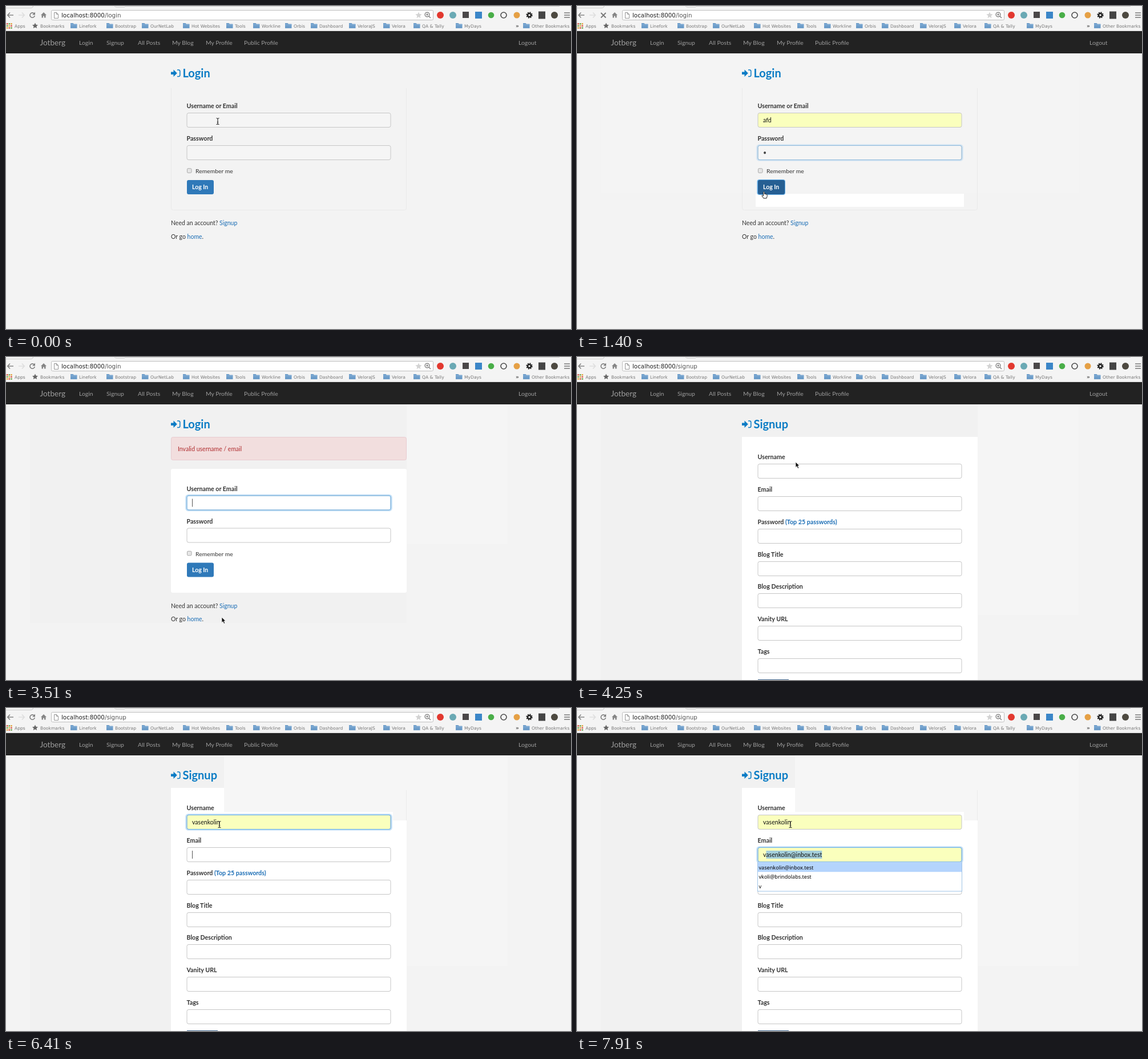
These frames come from a looping animation (990x566 px, 8 s). An HTML page:

```html
<!DOCTYPE html>
<html lang="en">
<head>
<meta charset="utf-8">
<title>Login and signup</title>
<style>
html, body { margin: 0; width: 100%; height: 100%; overflow: hidden; background: #f3f3f3; }
svg { display: block; width: 990px; height: 566px; }
text { white-space: pre; }
</style>
</head>
<body>
<svg id="stage" viewBox="0 0 990 566"></svg>
<script>
const UI = 'Lato, sans-serif', CHROME = '"DejaVu Sans", sans-serif', MENU = '"Noto Sans", sans-serif';
const USER = 'vasenkolin', MAIL = USER + '@inbox.test', WORK = 'vkoli@brindolabs.test';
const BLUE = '#0a7cc5', LINK = '#1a6db5', INK = '#333', LEFT = 326;

const rect = (x, y, w, h, fill, extra = '') =>
  `<rect x="${x}" y="${y}" width="${w}" height="${h}" fill="${fill}" ${extra}/>`;
const path = (d, fill, stroke = 'none', width = 1, extra = '') =>
  `<path d="${d}" fill="${fill}" stroke="${stroke}" stroke-width="${width}" ${extra}/>`;
const circle = (x, y, r, fill, extra = '') => `<circle cx="${x}" cy="${y}" r="${r}" fill="${fill}" ${extra}/>`;
const text = (x, y, s, size = 10.5, fill = INK, weight = 400, font = UI) =>
  `<text x="${x}" y="${y}" font-size="${size}" fill="${fill}" font-weight="${weight}" font-family='${font}'>${s}</text>`;
const link = s => `<tspan fill="${LINK}">${s}</tspan>`;

const pen = document.createElement('canvas').getContext('2d');
const widthOf = s => {
  pen.font = '10.6px ' + UI;
  return pen.measureText(s).width;
};

function folder(x, name) {
  return path(`M${x} 30h4.5l1.5 1.5h5.5v7.5h-11.5z`, '#6c9cc9') +
    path(`M${x} 33h11.5`, 'none', '#8fb7dc') + text(x + 15, 37.6, name, 7.6, '#777', 400, CHROME);
}

function toolbar() {
  let s = rect(0, 0, 990, 44, '#f4f4f4') + rect(0, 43, 990, 1, '#dcdcdc') +
    path('M0 3.5H44q3 0 4-4M190 0q1 2 4 2h14M208 .5H970', 'none', '#ccc') +
    path('M13 16H3M7 11.500L2.800 16l4.200 4.500', 'none', '#868686', 1.7) +
    path('M22 16h10M28 11.500l4.200 4.500-4.200 4.500', 'none', '#dedede', 1.7) +
    path('M61 16l5-5 5 5h-1.500v4.500h-2.500v-3h-2v3h-2.500v-4.500z', '#858585') +
    rect(79.5, 7.5, 669, 17, '#fff', 'rx="2" stroke="#bdbdbd"') +
    path('M84.500 11.500h4l3 3v7h-7zM88.500 11.500v3h3', '#fff', '#888', .9) +
    path('M723 10.500l1.600 3.600 4 .4-3 2.700.9 4-3.500-2.100-3.500 2.100.9-4-3-2.700 4-.4z', '#d3d3d3') +
    circle(738, 15, 3.9, 'none', 'stroke="#777" stroke-width="1.300"') +
    path('M741 18l3 3M736 15h4M738 13v4', 'none', '#777', 1.2);
  s += circle(761, 16, 6, '#e2382f') + circle(783, 16, 6, '#6aa9b4') + rect(800, 10, 11, 11, '#4a4748') +
    rect(822, 10, 12, 12, '#3b86c8') + circle(850, 16, 5.3, '#49ae48') +
    circle(872, 16, 5, 'none', 'stroke="#4b4b4b" stroke-width="1.600"') +
    circle(895, 16, 5.5, '#e5a045') +
    circle(917, 16, 4.7, 'none', 'stroke="#222" stroke-width="2" stroke-dasharray="1.850"') +
    circle(917, 16, 3, 'none', 'stroke="#222" stroke-width="2.500"') +
    rect(933, 9.5, 12, 13, '#444') + circle(961, 16, 6, '#4d4940') +
    path('M978 12h10M978 16h10M978 20h10', 'none', '#777', 1.7);
  for (let i = 0; i < 9; i++)
    s += rect(1 + i % 3 * 3.6, 30 + (i / 3 | 0) * 3.6, 2.5, 2.5, ['#d9534a', '#6aa84f', '#e0a33b'][(i + (i / 3 | 0)) % 3]);
  s += text(15, 37.6, 'Apps', 7.6, '#777', 400, CHROME) +
    path('M51 29.500l1.500 3.300 3.500.4-2.600 2.400.7 3.500-3.100-1.800-3.100 1.800.7-3.500-2.600-2.400 3.500-.4z', '#666') +
    text(60, 37.6, 'Bookmarks', 7.6, '#777', 400, CHROME) +
    text(893, 37.6, '»', 9, '#555', 700, CHROME);
  const marks = { 113: 'Linefork', 176: 'Bootstrap', 238: 'OurNetLab', 310: 'Hot Websites', 386: 'Tools',
    433: 'Workline', 489: 'Orbis', 534: 'Dashboard', 601: 'VeloraJS', 661: 'Velora', 714: 'QA &amp; Tally',
    788: 'MyDays', 906: 'Other Bookmarks' };
  for (const x in marks) s += folder(+x, marks[x]);
  s += rect(0, 44, 990, 39, '#222') + text(59.5, 69, 'Jotberg', 13.6, '#9d9d9d');
  const nav = { 128: 'Login', 176: 'Signup', 231: 'All Posts', 291: 'My Blog', 350: 'My Profile',
    417: 'Public Profile', 898: 'Logout' };
  for (const x in nav) s += text(x, 67.5, nav[x], 10.4, '#9d9d9d');
  return s;
}

const chrome = toolbar();

function address(page, loading) {
  return text(97, 19.7, `localhost:8000<tspan fill="#555">/${page === 'signup' ? 'signup' : 'login'}</tspan>`, 10.3, '#222', 400, CHROME) +
    (loading ? path('M42 12l8.500 8.500M50.500 12l-8.500 8.500', 'none', '#777', 1.8)
      : path('M49.500 13.500a4.200 4.200 0 1 0 .8 3.500', 'none', '#808080', 1.6) + path('M51 10.500v5h-5z', '#808080'));
}

function heading(s) {
  return path('M289 115.500h4.500v-4l6.300 6.300-6.300 6.300v-4h-4.500z', BLUE) +
    path('M300 112h2.500q2.300 0 2.300 2.300v7q0 2.300-2.300 2.300h-2.500', 'none', BLUE, 1.5) +
    text(309.5, 124.7, s, 20, BLUE, 700);
}

function field(top, label, { value = '', ring = 0, yellow, caret, sel, fill }) {
  let s = text(316.5, top - 8, label, 10.7, INK, 700);
  if (ring) s += rect(315.5, top - .5, 360, 27, 'none', `rx="4" stroke="#66afe9" stroke-width="2.500" opacity="${ring * .4}"`);
  s += rect(317, top + .5, 357, 25, yellow ? '#faffbd' : fill, 'rx="3" stroke="#c6c6c6"');
  if (ring) s += rect(317, top + .5, 357, 25, 'none', `rx="3" stroke="#66afe9" opacity="${ring}"`);
  if (sel) {
    const x = LEFT + widthOf(value[0]);
    s += rect(x, top + 6, widthOf(value) + LEFT - x, 14, '#a5cfda');
  }
  s += text(LEFT, top + 16.6, value, 10.6, yellow ? '#111' : '#444');
  if (caret) s += rect(LEFT + widthOf(value), top + 6, 1, 14, '#555');
  return s;
}

function menu(top, items, hot) {
  const row = 16.7;
  let s = rect(316.5, top + .5, 358, items.length * row + 1, '#fff', 'stroke="#9fc3e6"');
  if (hot) s += rect(317, top + 1, 357, row, '#b4d4fd');
  items.forEach((item, i) => s += text(318.5, top + 13 + i * row, item, 9.1, '#000', 400, MENU));
  return s;
}

const pointers = {
  beam: path('M-2.500-5.500q2 0 2.500 1.200q.5-1.200 2.500-1.200M0-4.300v8.600M-2.500 5.500q2 0 2.500-1.200q.5 1.200 2.500 1.200M-1.200 1.500h2.400', 'none', '#222', 1.1),
  arrow: path('M0 0v9.500l2.200-2 1.700 3.800 1.800-.8-1.700-3.700h3z', '#111', '#fff', .7),
  hand: path('M-1.500-5q1-1.300 2 0v3.500q1-.8 1.600.2q1-.6 1.600.4q1.400-.3 1.500 1v2.400l-1.200 3.500h-5l-3.200-4.500q.4-1.400 1.700-.5l1 1z', '#fff', '#222', 1)
};

const fieldProps = (s, i, fill) => ({
  value: s.values[i], ring: s.rings[i], yellow: s.yellow[i], caret: s.caret === i, sel: s.sel === i, fill
});

function loginPage(s) {
  const failed = s.page === 'error', dy = failed ? 55.5 : 0, fill = failed ? '#fff' : '#f5f5f5';
  let out = '';
  if (failed) {
    out += rect(42, 83, 660, 383, '#f1f1f1') + rect(702, 83, 177, 245, '#f5f5f5') + heading('Login') +
      rect(289.5, 140.5, 412, 40, '#f2dede', 'rx="3" stroke="#e8cbd0"') +
      text(301, 164.5, 'Invalid username / email', 10.5, '#b02c2e') + rect(289, 196, 413, 217, '#fff', 'rx="3"');
  } else {
    if (s.tint) out += rect(42, 83, 837, 245, '#f4f4f4');
    out += heading('Login') + path('M289.500 144v210q0 3.500 3 3.500h406q3 0 3-3.500v-210', 'none', '#e9e9e9');
    if (s.patch) out += rect(313, 329, 365, 23, '#fff');
  }
  out += field(187 + dy, 'Username or Email', fieldProps(s, 0, fill)) +
    field(244 + dy, 'Password', fieldProps(s, 1, fill)) +
    rect(317.5, 284.8 + dy, 7.5, 7.5, '#e6e6e6', 'rx="1.500" stroke="#aaa"') + text(332, 293 + dy, 'Remember me', 10.4);
  if (s.pressed) out += rect(315.5, 304, 49.5, 27, '#66afe9', 'rx="4"');
  out += rect(317, 305 + dy, 47, 25, s.hover ? '#265f93' : '#2f79b9', 'rx="3"') +
    text(326, 321 + dy, 'Log In', 10.5, '#fff', 700) +
    text(289, 384 + dy, 'Need an account? ' + link(s.under ? '<tspan text-decoration="underline">Signup</tspan>' : 'Signup')) +
    text(289, 407.8 + dy, `Or go ${link('home')}.`);
  return out;
}

function signupPage(s) {
  let out = rect(42, 83, 660, 483, '#f1f1f1') + rect(702, 83, 177, 369, '#f5f5f5') + rect(289, 140, 413, 426, '#fff');
  if (s.patch) out += rect(382, 83, 497, 114, '#f6f6f6') + rect(313, 182, 365, 40, '#fff') + rect(701, 144, 1, 53, '#ebebeb');
  out += heading('Signup');
  ['Username', 'Email', 'Password ' + link('(Top 25 passwords)'), 'Blog Title', 'Blog Description', 'Vanity URL', 'Tags']
    .forEach((label, i) => out += field(Math.round(187 + i * 56.85), label, fieldProps(s, i, '#fff')));
  return out + rect(317, 565, 54, 1, '#3c618a');
}

// Each step changes only the listed parts of the previous state.
const blank = { values: ['', ''], rings: [0, 0], yellow: [], caret: -1, list: null, hot: false, sel: -1,
  patch: false, loading: false, hover: false, pressed: false, under: false };
const at = (kind, x, y) => ({ cursor: [kind, x, y] });
const steps = [
  [0, { ...blank, page: 'login', tint: false, ...at('beam', 371, 202) }],
  [150, { rings: [1, 0], caret: 0 }],
  [300, { values: ['a', ''], list: ['afd', 'asdf', 'abc', 'admin', 'aaa', 'a1', 'author', 'a'], patch: true }],
  [450, { values: ['af', ''], list: ['afd'] }],
  [600, { values: ['afd', ''], yellow: [1], list: null }],
  [800, { rings: [0, 1], caret: 1 }],
  [950, { values: ['afd', '•'] }],
  [1100, { caret: -1, hover: true, ...at('hand', 328, 331) }],
  [1250, { rings: [0, .6], pressed: true, loading: true }],
  [1400, { tint: true }],
  [1690, { ...blank, page: 'error', ...at('arrow', 328, 326) }],
  [1840, at('arrow', 330, 298)],
  [1990, at('beam', 333, 262)],
  [2170, at('beam', 334, 245)],
  [2320, { rings: [.5, 0], caret: 0, ...at('beam', 334, 246) }],
  [2470, { rings: [1, 0] }],
  [2770, { caret: -1 }],
  [3060, { caret: 0, ...at('beam', 336, 256) }],
  [3210, at('arrow', 344, 330)],
  [3360, at('arrow', 362, 412)],
  [3510, at('arrow', 378, 456)],
  [3660, { under: true, ...at('hand', 385, 440) }],
  [3810, { caret: -1, ...at('hand', 385, 439) }],
  [4100, { loading: true }],
  [4250, { ...blank, page: 'signup', ...at('arrow', 383, 184) }],
  [4430, { patch: true, ...at('arrow', 380, 185) }],
  [4600, at('beam', 376, 200)],
  [4750, { rings: [.5, 0], caret: 0, ...at('beam', 374, 204) }],
  [4910, { rings: [1, 0] }],
  [5060, { caret: 0 }],
  [5360, { values: [USER[0], ''], list: [USER, MAIL, WORK, USER[0]] }],
  [5660, { values: [USER.slice(0, 2), ''], list: [USER, MAIL] }],
  [6110, { values: [USER, ''], yellow: [1], caret: -1, sel: 0, hot: true }],
  [6410, { list: null, hot: false, sel: -1, caret: 1 }],
  [6560, { rings: [.3, .7] }],
  [6710, { rings: [0, 1] }],
  [7160, { caret: -1 }],
  [7610, { values: [USER, USER[0]], caret: 1, list: [MAIL, WORK, USER[0]] }],
  [7760, { caret: -1, hot: true, values: [USER, MAIL], yellow: [1, 1], sel: 1 }]
];

function draw(time) {
  const s = Object.assign({}, ...steps.filter(step => step[0] <= time).map(step => step[1]));
  let out = rect(0, 0, 990, 566, '#f3f3f3') + chrome + address(s.page, s.loading) +
    (s.page === 'signup' ? signupPage(s) : loginPage(s));
  if (s.list) out += menu(s.rings[1] ? 269.5 : 213, s.list, s.hot);
  const [kind, x, y] = s.cursor;
  return out + `<g transform="translate(${x} ${y})">${pointers[kind]}</g>`;
}

const stage = document.getElementById('stage');
let shown = '';
function tick() {
  const next = draw(performance.now() % 8000);
  if (next !== shown) stage.innerHTML = shown = next;
  requestAnimationFrame(tick);
}
tick();
</script>
</body>
</html>
```
